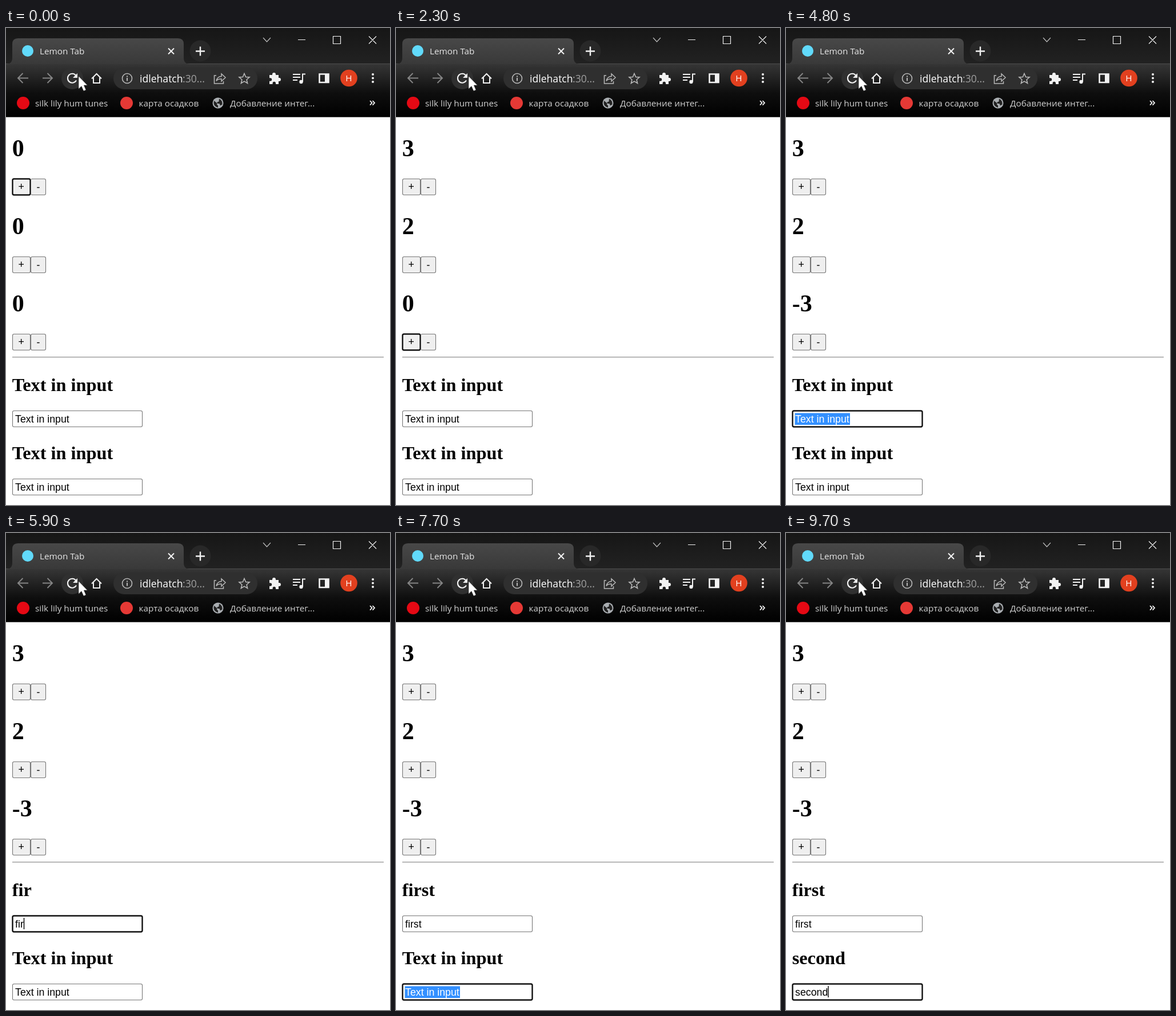
These frames come from a looping animation (672x833 px, 9.8 s). An HTML page:

```html
<!DOCTYPE html>
<html lang="en">
<head>
<meta charset="utf-8">
<title>Counters and inputs</title>
<style>
html, body { margin: 0; width: 100%; height: 100%; overflow: hidden; background: #fff; }
svg { display: block; }
text { white-space: pre; }
.bar text { font: 15.3px "Open Sans", "Noto Sans", sans-serif; fill: #d2d2d2; }
.bar .url { font-size: 17.6px; }
.icon { fill: none; stroke: #f2f2f2; stroke-width: 2; }
.solid { fill: #f2f2f2; }
.dim { stroke: #858585; }
.soft { stroke: #b8b8b8; }
.h1 { font: bold 42px "Liberation Serif", "Times New Roman", serif; }
.h2 { font: bold 32.3px "Liberation Serif", "Times New Roman", serif; }
.field { font: 17.78px "Liberation Sans", Arial, sans-serif; }
.mid { text-anchor: middle; }
.box { stroke: #767676; stroke-width: 1.1; }
</style>
</head>
<body>
<svg id="stage" width="672" height="833" viewBox="0 0 672 833">
  <defs>
    <linearGradient id="frame" x2="0" y2="1"><stop stop-color="#161616"/><stop offset="1" stop-color="#222"/></linearGradient>
    <linearGradient id="tab" x2="0" y2="1"><stop stop-color="#484848"/><stop offset="1" stop-color="#393939"/></linearGradient>
    <linearGradient id="tools" x2="0" y2="1"><stop stop-color="#363636"/><stop offset=".55" stop-color="#0e0e0e"/><stop offset="1" stop-color="#000"/></linearGradient>
  </defs>
  <g class="bar">
    <rect width="672" height="63" fill="url(#frame)"/>
    <rect y="62.5" width="672" height="93" fill="url(#tools)"/>
    <path d="M0 62.5H672" stroke="#4c4c4c"/>
    <path d="M0 63Q11 63 11 52V28Q11 18 21 18H301Q311 18 311 28V52Q311 63 322 63Z" fill="url(#tab)"/>
    <path d="M0 155.5H672" stroke="#555"/>

    <circle cx="38" cy="40" r="10" fill="#61dafb"/>
    <text x="59" y="46" style="fill:#e6e6e6">Lemon Tab</text>
    <path class="icon" d="M284 35.500l10 10m0-10l-10 10"/>
    <circle cx="340" cy="40" r="18.500" fill="#282828"/>
    <path class="icon" style="stroke-width:2.400" d="M332 40.500h16m-8-8v16"/>
    <g class="icon" style="stroke-width:1.200">
      <path d="M450 17l6.500 7 6.500-7" stroke="#bbb"/>
      <path d="M511 20.500h13M572.500 14.500h13v13h-13zM635 14.500l13 13m0-13l-13 13"/>
    </g>

    <path class="icon dim" d="M39 87.500H21m8.500-8.500l-8.500 8.500 8.500 8.500"/>
    <path class="icon dim" d="M64 87.500H81m-8.500-8.500l8.500 8.500-8.500 8.500"/>
    <circle cx="116" cy="88" r="19" fill="#303030"/>
    <path class="icon" style="stroke-width:2.200" d="M123 91.500A8 8 0 1 1 122 82.500"/>
    <path class="solid" d="M125 79v8h-8z"/>
    <path class="icon" d="M150 88.500l8.500-8.500 8.500 8.500M153 86.500v9.500h11v-9.500"/>
    <rect x="188" y="69" width="252" height="38" rx="19" fill="#2f2f2f"/>
    <circle class="icon soft" cx="212" cy="88" r="8.500" style="stroke-width:1.600"/>
    <path class="icon soft" d="M212 87v5.500m0-9v2"/>
    <text class="url" x="234" y="94.500" style="fill:#fff">idlehatch</text>
    <text class="url" x="309" y="94.500" style="fill:#a0a0a0">:30...</text>
    <path class="icon soft" style="stroke-width:1.500" d="M368 83h-3.500v14h16v-4M368 92.500q2-8 9-8v-4.500l7 6.500-7 6.500v-4q-6-.5-9 3.500z"/>
    <path class="icon soft" style="stroke-width:1.600" d="M417 79.500l2.600 6 6.400.500-4.900 4.200 1.500 6.300-5.600-3.400-5.600 3.400 1.500-6.300-4.900-4.200 6.400-.5z"/>
    <path class="solid" d="M461 82h5v-1a3 3 0 0 1 6 0v1h5v5h1a3 3 0 0 1 0 6h-1v5h-5v-1.500a2.700 2.700 0 0 0-5.400 0V98H461v-5.300h1.500a2.700 2.700 0 0 0 0-5.400H461z"/>
    <path class="icon" d="M502 81h13M502 86h13M502 91h8M519 94V80.500h5"/>
    <circle class="solid" cx="516.500" cy="94" r="3.200"/>
    <path class="icon" style="stroke-width:2.600" d="M548.500 80.500h16v14.500h-16z"/>
    <path class="solid" d="M558 80h7v15h-7z"/>
    <circle cx="600" cy="87.500" r="14.800" fill="#e2401f"/>
    <text class="mid" x="600" y="93" style="fill:#fff">H</text>
    <g class="solid"><circle cx="642" cy="81" r="2"/><circle cx="642" cy="87.500" r="2"/><circle cx="642" cy="94" r="2"/></g>
    <path d="M127 84v22.500l5-4.800 3.800 8.300 4.200-1.800-3.600-8.200h6.100z" fill="#fff" stroke="#222" stroke-width=".6"/>

    <circle cx="30" cy="131" r="11" fill="#e50914"/>
    <text x="51" y="136.500">silk lily hum tunes</text>
    <circle cx="211" cy="131" r="11" fill="#e53935"/>
    <text x="232.500" y="136.500">карта осадков</text>
    <circle cx="371" cy="131" r="9.500" fill="#a9adb1"/>
    <path d="M364 127l5 4v2.500l2 2v3.500q-7-2-7.500-8zM373 123.500q6 3 5.500 10l-3.500 2-1.500-3.500h-4v-2.500l3-1z" fill="#222"/>
    <text x="392" y="136.500">Добавление интег...</text>
    <path class="icon" style="stroke-width:1.800" d="M637 127l3.500 3.800-3.500 3.800m4.500-7.600l3.500 3.800-3.500 3.800"/>
  </g>
  <path d="M11 574.500H661" stroke="#999"/>
  <path d="M11 575.500H661" stroke="#d8d8d8"/>
</svg>
<script>
const LOOP = 9800, PLACEHOLDER = "Text in input", FIELD_X = 16;
const stage = document.getElementById("stage");

function add(tag, attrs, content = "") {
  const el = document.createElementNS("http://www.w3.org/2000/svg", tag);
  for (const key in attrs) el.setAttribute(key, attrs[key]);
  el.textContent = content;
  return stage.appendChild(el);
}

const show = (el, on) => el.setAttribute("visibility", on ? "visible" : "hidden");
const passed = (times, t) => times.filter(time => time <= t).length;

// Focusable boxes in tab order
const boxes = [];
function addBox(x, y, width, height, fill) {
  const box = { x: x + .5, y: y + .5, width: width - 1, height: height - 1, rx: 2.5 };
  add("rect", { ...box, fill, class: "box" });
  boxes.push(box);
}

const counters = [
  { y: 263, step: 1, presses: [300, 500, 700] },
  { y: 399, step: 1, presses: [1300, 1600] },
  { y: 534, step: -1, presses: [2900, 3200, 3500] }
];
for (const c of counters) {
  c.label = add("text", { x: 10.7, y: c.y - 38.7, class: "h1" });
  addBox(11, c.y, 32, 29, "#efefef");
  addBox(43, c.y, 27, 29, "#efefef");
  add("text", { x: 26.8, y: c.y + 20, class: "field mid" }, "+");
  add("text", { x: 56.5, y: c.y + 20.5, class: "field mid" }, "-");
}

const inputs = [
  { y: 668, word: "first", keys: [5200, 5500, 5700, 6200, 6500] },
  { y: 787, word: "second", keys: [7900, 8200, 8500, 8800, 9100, 9400] }
];
for (const input of inputs) {
  const y = input.y;
  input.heading = add("text", { x: 10.7, y: y - 34.5, class: "h2" });
  addBox(11, y, 228, 29, "#fff");
  input.selection = add("rect", { x: 15.5, y: y + 4.5, width: 96.5, height: 20.5, fill: "#3390ff" });
  input.value = add("text", { x: FIELD_X, y: y + 20.5, class: "field" });
  input.caret = add("rect", { y: y + 4, width: 1.4, height: 20 });
}

const halo = add("rect", { fill: "none", stroke: "#fff", "stroke-width": 4 });
const ring = add("rect", { fill: "none", stroke: "#101010", "stroke-width": 2.4 });
const focusTimes = [0, 900, 1100, 1900, 2200, 2600, 4300, 7200];

function render(t) {
  const focus = passed(focusTimes, t) - 1;
  for (const key in boxes[focus]) {
    halo.setAttribute(key, boxes[focus][key]);
    ring.setAttribute(key, boxes[focus][key]);
  }
  for (const c of counters) c.label.textContent = c.step * passed(c.presses, t);
  inputs.forEach((input, i) => {
    const typed = passed(input.keys, t);
    const focused = focus === i + 6;
    const selected = focused && !typed;
    const text = typed ? input.word.slice(0, typed) : PLACEHOLDER;
    input.heading.textContent = input.value.textContent = text;
    input.value.setAttribute("fill", selected ? "#fff" : "#000");
    show(input.selection, selected);
    input.caret.setAttribute("x", FIELD_X + input.value.getComputedTextLength());
    show(input.caret, focused && typed && (t - input.keys[typed - 1]) % 1000 < 500);
  });
}

function tick() {
  render(performance.now() % LOOP);
  requestAnimationFrame(tick);
}
tick();
</script>
</body>
</html>
```
